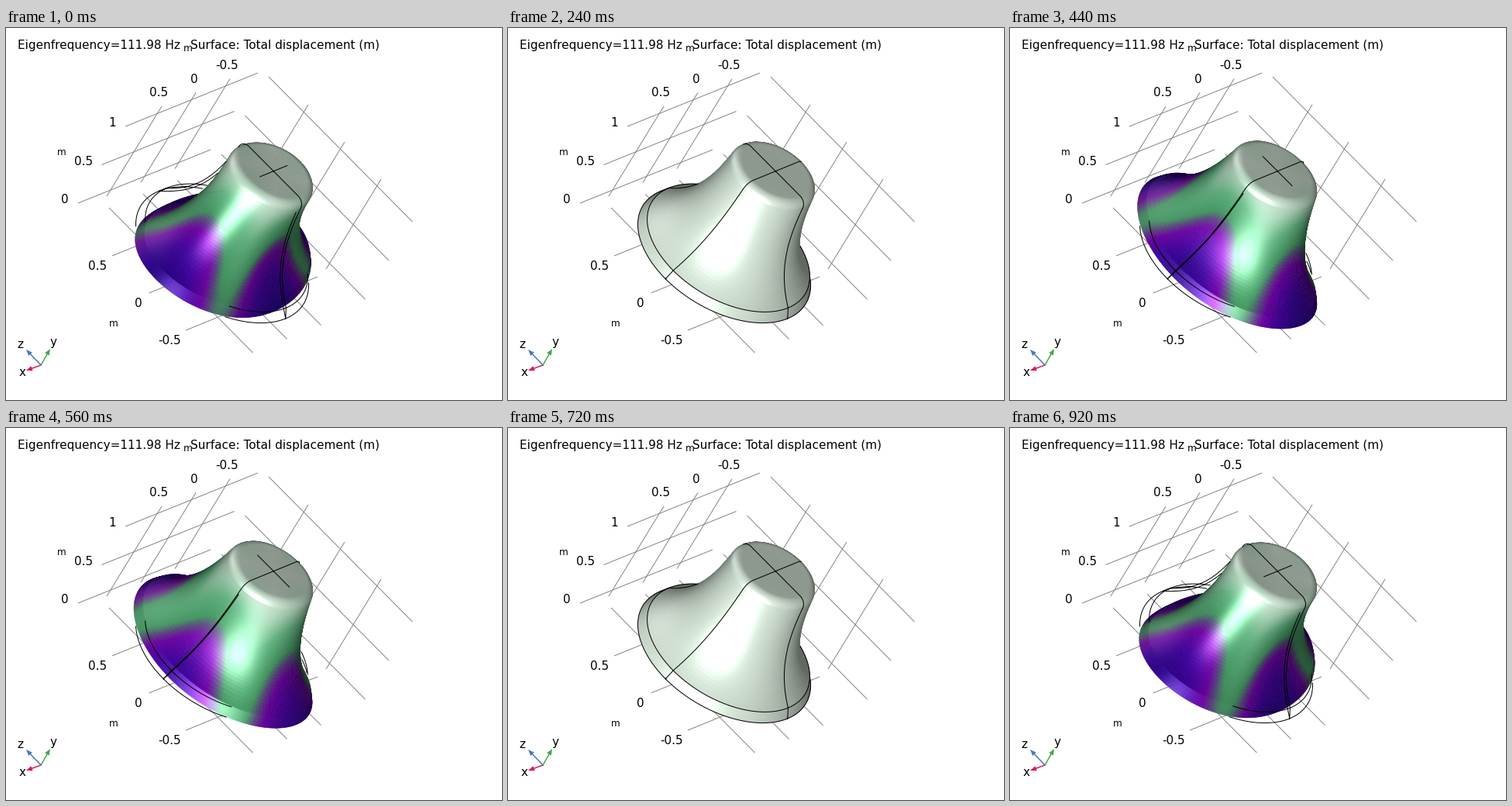
These frames come from a looping animation (640 by 480 pixels, 0.96 s). A matplotlib script:

```python
import numpy as np
import matplotlib.pyplot as plt
from matplotlib.animation import FuncAnimation
from matplotlib.collections import LineCollection, PolyCollection

W, H = 640, 480
FRAMES, INTERVAL = 24, 40

# Orthographic camera: screen offset of each unit axis (y points down)
ORIGIN = np.array([279.0, 292.7])
AXES = np.array([[-88.0, 36.0], [61.0, -99.5], [-95.0, -95.5]])
VIEW = np.cross(AXES[:, 0], -AXES[:, 1])
VIEW /= np.linalg.norm(VIEW)

# Bell dimensions
LIP_Y, LIP_R, RIM_R = 0.09, 0.81, 0.861
SHOULDER, FILLET = 1.0, 0.085
CAP_Y, CAP_R = SHOULDER + FILLET, 0.335
SWING, TILT = 0.14, 0.06
MAX_DISP = np.hypot(SWING, TILT * RIM_R ** 2)

LEVELS = [0, 0.1, 0.25, 0.45, 0.53, 0.62, 0.8, 1]
COLORS = np.array([
    (232, 250, 234), (190, 238, 205), (110, 200, 145), (72, 165, 105),
    (95, 75, 135), (115, 0, 175), (65, 0, 165), (38, 0, 140)]) / 255


def unit(*v):
    return np.array(v) / np.linalg.norm(v)


KEY = unit(0.893, 0.342, -0.291)
SIDE = unit(0.48, 0.70, 0.52)


def project(p):
    return ORIGIN + p @ AXES


def body(y):
    return 0.386 + 0.544 * np.exp(-y / 0.36)


def radius(y):
    """Outer radius of the resting bell at height y."""
    lip = RIM_R + (LIP_R - RIM_R) * y / LIP_Y
    bend = np.clip(y - SHOULDER, 0, FILLET)
    fillet = CAP_R + np.sqrt(FILLET ** 2 - bend ** 2)
    return np.where(y < LIP_Y, lip, np.where(y < SHOULDER, body(y), fillet))


def outline(k):
    """Outer profile from the rim to the middle of the cap."""
    y1 = np.linspace(0, LIP_Y, 4 * k + 1)
    y2 = np.linspace(LIP_Y, SHOULDER, 34 * k)[1:]
    t = np.linspace(0, np.pi / 2, 10 * k)[1:]
    r4 = np.linspace(CAP_R, 0.001, 8 * k)[1:]
    y = np.concatenate([y1, y2, SHOULDER + FILLET * np.sin(t),
                        np.full(r4.size, CAP_Y)])
    r = np.concatenate([radius(y1), body(y2), CAP_R + FILLET * np.cos(t), r4])
    return r, y


def mode(r, th, y):
    """Radial, tangential and axial displacement at full swing."""
    w = SWING * (1 - np.clip(y / CAP_Y, 0, 1) ** 1.3)
    c = np.cos(2 * th)
    return w * c, -0.5 * w * np.sin(2 * th), TILT * r ** 2 * c


def cartesian(r, th, y, tangent=0):
    c, s = np.cos(th), np.sin(th)
    return np.stack([r * c - tangent * s, y + 0 * th, r * s + tangent * c], -1)


prof_r, prof_y = outline(1)
theta = np.linspace(0, 2 * np.pi, 241)
GR, GT = np.meshgrid(prof_r, theta, indexing="ij")
GY = np.repeat(prof_y[:, None], theta.size, 1)
UR, UT, UY = mode(GR, GT, GY)
DISP = np.sqrt(UR ** 2 + UT ** 2 + UY ** 2) / MAX_DISP
DISP = (DISP[1:, 1:] + DISP[:-1, 1:] + DISP[1:, :-1] + DISP[:-1, :-1]) / 4


def surface(a):
    """Visible quads, far to near, with their lit colours."""
    p = cartesian(GR + a * UR, GT, GY + a * UY, a * UT)
    q = np.stack([p[:-1, :-1], p[:-1, 1:], p[1:, 1:], p[1:, :-1]], 2)
    n = np.cross(q[:, :, 3] - q[:, :, 1], q[:, :, 2] - q[:, :, 0])
    n /= np.linalg.norm(n, axis=-1, keepdims=True) + 1e-12

    front = n @ VIEW > 0
    q, n, d = q[front], n[front], abs(a) * DISP[front]
    order = np.argsort(q.mean(1) @ VIEW)
    q, n, d = q[order], n[order], d[order]

    base = np.stack([np.interp(d, LEVELS, ch) for ch in COLORS.T], -1)
    key = np.clip(n @ KEY, 0, 1)
    side = np.clip(n @ SIDE, 0, 1)
    shine = 0.55 * key ** 32 + 0.15 * side ** 20
    rgb = base * (0.42 + 0.55 * key)[:, None] + shine[:, None]
    return project(q), np.clip(rgb, 0, 1)


def resting_edges():
    """Edges of the undeformed bell: four meridians inside and out, two rings."""
    edges = []
    r, y = outline(5)
    yi = np.linspace(0, 0.95, 200)
    ri = body(yi) - 0.025 - 0.044 * np.exp(-yi / 0.1)
    for th in np.arange(4) * np.pi / 2:
        edges.append(cartesian(r, np.full(r.size, th), y))
        edges.append(cartesian(ri, np.full(yi.size, th), yi))
    ring = np.linspace(0, 2 * np.pi, 500)
    for rr, yy in ((RIM_R, 0.0), (LIP_R, LIP_Y)):
        edges.append(cartesian(rr, ring, yy))
    gap = np.full((1, 3), np.nan)
    return np.concatenate([part for e in edges for part in (e, gap)])


EDGES = resting_edges()
EDGES_2D = project(EDGES)
STEPS = 0.0042 + np.linspace(0, 1, 110) ** 1.5 * 2.2
RAYS = EDGES[:, None] + STEPS[:, None] * VIEW
RAY_R = np.hypot(RAYS[..., 0], RAYS[..., 2])
RAY_T = np.arctan2(RAYS[..., 2], RAYS[..., 0])
RAY_UY = mode(RAY_R, RAY_T, RAYS[..., 1])[2]


def visible_edges(a):
    """Hide edge points whose ray to the viewer meets the deformed bell."""
    y = RAYS[..., 1] - a * RAY_UY
    wall = radius(y) + a * mode(RAY_R, RAY_T, y)[0]
    hidden = ((y > 0) & (y < CAP_Y) & (RAY_R < wall)).any(1)
    return np.where(hidden[:, None], np.nan, EDGES_2D)


def px(n):
    return n * 0.72


fig = plt.figure(figsize=(W / 100, H / 100), dpi=100, facecolor="white")
ax = fig.add_axes([0, 0, 1, 1])
ax.set_xlim(0, W)
ax.set_ylim(H, 0)
ax.axis("off")


def label(x, y, s, size=15.2, ha="center"):
    ax.text(x, y, s, fontsize=px(size), family="DejaVu Sans", ha=ha,
            va="baseline", color="black", zorder=5)


# start, step between the three lines, extent of each line
GRID = [((93, 226), (30.5, -49.5), (171, -69)),
        ((201, 101), (44, -17.7), (-71, 116)),
        ((339, 63), (-30.5, 50), (185.5, 187)),
        ((390, 99), (47, 48), (-71, 116)),
        ((133, 232), (44, -17.7), (185.5, 187)),
        ((137, 294), (47.5, 48), (170, -69))]
lines = []
for start, step, extent in GRID:
    for i in range(3):
        s = np.array(start) + i * np.array(step)
        lines.append([s, s + extent])
ax.add_collection(LineCollection(lines, colors="#868686", linewidths=px(1),
                                 zorder=1))

label(15, 27, "Eigenfrequency=111.98 Hz", ha="left")
label(238, 27, "Surface: Total displacement (m)", ha="left")
for x, y in ((234.5, 30.5), (71.5, 163.5), (139, 385)):
    label(x, y, "m", 12)
for x, y, s in ((137, 127, "1"), (100, 177, "0.5"), (76, 226, "0"),
                (197, 88, "0.5"), (243, 71, "0"), (285, 53, "-0.5"),
                (118, 312, "0.5"), (171, 360, "0"), (211, 408, "-0.5")):
    label(x, y, s)

# Axis triad
hub = np.array([45, 435])
for tip, color, name, pos in (((26, 442), "#d81b5c", "x", (21, 449)),
                              ((57, 414), "#4aa548", "y", (61, 410)),
                              ((26, 415), "#467abd", "z", (18.5, 413))):
    tip = np.array(tip)
    along = (tip - hub) / np.linalg.norm(tip - hub)
    across = np.array([-along[1], along[0]])
    neck = tip - 8 * along
    ax.plot(*zip(hub, neck), color=color, lw=px(1.5), zorder=5)
    ax.fill(*zip(tip, neck + 3.2 * across, neck - 3.2 * across),
            color=color, lw=0, zorder=5)
    label(*pos, name)

shell = PolyCollection([], linewidths=0.4, zorder=2)
ax.add_collection(shell, autolim=False)
wire, = ax.plot([], [], color="black", lw=px(1), zorder=3)


def draw(i):
    a = np.cos(2 * np.pi * i / FRAMES)
    verts, rgb = surface(a)
    shell.set_verts(verts)
    shell.set_facecolor(rgb)
    shell.set_edgecolor(rgb)
    wire.set_data(*visible_edges(a).T)
    return shell, wire


anim = FuncAnimation(fig, draw, frames=FRAMES, interval=INTERVAL,
                     repeat=True, repeat_delay=0, blit=False)
plt.show()
```
